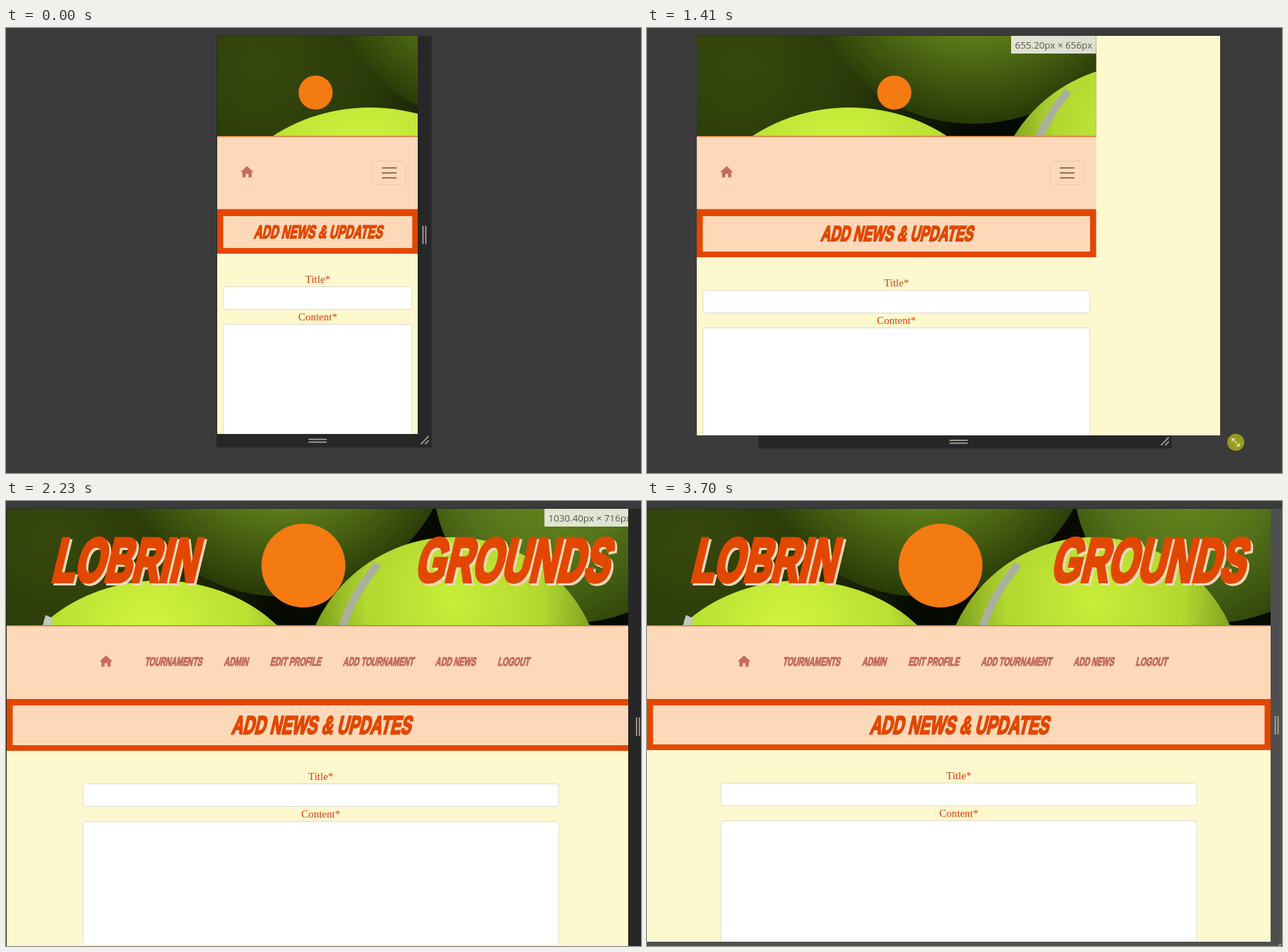
Recreate the animation shown at these times as an HTML page with a canvas. Size 893 by 627 pixels, loop 5.15 s.

```html
<!DOCTYPE html>
<html lang="en">
<head>
<meta charset="utf-8">
<title>Responsive page resize</title>
<style>
  html, body { margin: 0; width: 100%; height: 100%; overflow: hidden; background: #3b3b3b; }
  canvas { display: block; width: 893px; height: 627px; }
</style>
</head>
<body>
<canvas id="stage" width="893" height="627"></canvas>
<script>
const ctx = document.getElementById('stage').getContext('2d');
const LOOP = 5150, MID = 438, TOP = 11, ZOOM = 0.857, LAG = 70;
const ORANGE = '#e24700', PEACH = '#fdd9b9', CREAM = '#fef8cf', NAV = '#c16a5a', GRIP = '#b5ad9e';

// the picture changes in bursts: first, last, count
const bursts = [[130, 590, 7], [660, 800, 3], [940, 1410, 8], [1470, 1890, 7],
  [2030, 2290, 5], [2490, 2620, 3], [2890, 3360, 6], [3430, 3700, 3]];
const ticks = [0, ...bursts.flatMap(([a, b, n]) =>
  Array.from({ length: n }, (_, i) => Math.floor((a + (b - a) * i / (n - 1)) / 10) * 10))];

// viewport drag: time, half width, bottom edge
const drag = [[940, 141.4, 572], [970, 141.4, 573], [1270, 193.6, 573], [1410, 368, 574],
  [1540, 375, 574.6], [1610, 424, 584], [1820, 483, 594], [1890, 458, 594],
  [2220, 437.3, 633], [2890, 437.3, 633], [3290, 438.5, 621]];

const ramp = (t, a, b) => Math.min(1, Math.max(0, (t - a) / (b - a)));
const mix = (a, b, k) => a + (b - a) * k;

function viewport(t) {
  const i = Math.max(1, drag.findIndex(r => r[0] > t));
  const [a, b] = t >= drag.at(-1)[0] ? drag.slice(-2) : [drag[i - 1], drag[i]];
  const k = ramp(t, a[0], b[0]);
  return { half: mix(a[1], b[1], k), bottom: mix(a[2], b[2], k) };
}

function rect(x, y, w, h, color) {
  ctx.fillStyle = color;
  ctx.fillRect(x, y, w, h);
}

function clip(x, y, w, h) {
  ctx.beginPath();
  ctx.rect(x, y, w, h);
  ctx.clip();
}

function oval(x, y, rx, ry, fill) {
  ctx.beginPath();
  ctx.ellipse(x, y, rx, ry, 0, 0, 7);
  ctx.fillStyle = fill;
  ctx.fill();
}

const disc = (x, y, r, fill) => oval(x, y, r, r, fill);

function line(points, color, width) {
  ctx.beginPath();
  points.forEach(([x, y]) => ctx.lineTo(x, y));
  ctx.strokeStyle = color;
  ctx.lineWidth = width;
  ctx.stroke();
}

function shape(points, x, y, fill, stroke) {
  ctx.beginPath();
  points.forEach(([a, b]) => ctx.lineTo(x + a, y + b));
  ctx.closePath();
  ctx.fillStyle = fill;
  ctx.fill();
  if (!stroke) return;
  ctx.strokeStyle = stroke;
  ctx.lineWidth = 1;
  ctx.stroke();
}

function box(x, y, w, h, fill, stroke) {
  ctx.beginPath();
  ctx.roundRect(x, y, w, h, 4);
  if (fill) { ctx.fillStyle = fill; ctx.fill(); }
  ctx.strokeStyle = stroke;
  ctx.lineWidth = 1;
  ctx.stroke();
}

function radial(x, y, r, ...colors) {
  const g = ctx.createRadialGradient(x, y, 0, x, y, r);
  colors.forEach((c, i) => g.addColorStop(i / (colors.length - 1), c));
  return g;
}

// heavy slanted condensed face; returns the drawn width
function display(text, x, y, size, color, align = 'left') {
  ctx.save();
  ctx.transform(0.62, 0, -0.24, 1, x, y);
  ctx.font = `bold ${size}px "Liberation Sans", Arial, sans-serif`;
  ctx.textAlign = align;
  ctx.fillStyle = ctx.strokeStyle = color;
  ctx.lineWidth = size * 0.07;
  ctx.fillText(text, 0, 0);
  ctx.strokeText(text, 0, 0);
  ctx.restore();
  ctx.font = `bold ${size}px "Liberation Sans", Arial, sans-serif`;
  return ctx.measureText(text).width * 0.62;
}

function banner(text, x, y) {
  display(text, x + 3, y + 3, 86, PEACH);
  display(text, x, y, 86, ORANGE);
}

function seam(color, x, y, ...curve) {
  ctx.beginPath();
  ctx.moveTo(x, y);
  ctx.bezierCurveTo(...curve);
  ctx.strokeStyle = color;
  ctx.lineWidth = 11;
  ctx.stroke();
}

function photo(w, h) {
  rect(0, 0, w, h, radial(60, 40, 330, '#37490d', '#2a390a', '#060a01'));
  disc(800, -40, 200, radial(760, -40, 220, '#668a1c', '#54741a', '#31460b'));
  disc(389, -117, 241, radial(389, -140, 265, '#7c9c24', '#5f7f1a', '#283907'));
  disc(627, 252, 212, radial(630, 130, 250, '#c8ee3a', '#b2d831', '#56760f'));
  seam('#abb09c', 522, 78, 462, 150, 450, 230, 464, 300);
  oval(215, 291, 222, 190, radial(200, 180, 290, '#d4f640', '#b9df32', '#5d7d10'));
  seam('#c6c7bd', 60, 152, 44, 190, 76, 230, 90, 295);
}

function house(x, y) {
  const side = [[9, 0], [6.5, 0.5], [6.5, 7.5], [2, 7.5], [2, 2.5]];
  const left = side.map(([a, b]) => [-a, b]).reverse();
  shape([[0, -8.5], ...side, ...left], x, y, '#c96b5c');
}

function header(L, W, px) {
  const wide = px >= 992, small = px < 768;
  const H = small ? 141 : wide ? 164 : 287;
  ctx.save();
  ctx.translate(L, TOP);
  clip(0, 0, W, H);
  photo(W, H);
  if (small) {
    disc(W / 2 - 3, 80, 24, '#f47a12');
  } else {
    const d = W - (wide ? 873 : 750);
    disc((wide ? 410 : 543) + 0.7 * d, 80, 59, '#f47a12');
    banner('LOBRIN', (wide ? 59 : 104) + 0.23 * d, 102);
    if (wide) banner('GROUNDS', 563 + 0.957 * d, 102);
    else banner('GROUNDS', 234 + 0.5 * d, 248);
  }
  ctx.restore();
  return TOP + H;
}

function menu(L, W, y, wide) {
  rect(L, y, W, 105, PEACH);
  rect(L, y, W, 1.4, '#d4702a');
  if (wide) {
    const C = L + W / 2;
    house(C - 302, y + 51);
    let x = C - 248;
    for (const s of ['TOURNAMENTS', 'ADMIN', 'EDIT PROFILE', 'ADD TOURNAMENT', 'ADD NEWS', 'LOGOUT'])
      x += display(s, x, y + 57, 16.8, NAV) + 30.8;
    return;
  }
  rect(L, y + 103, W, 1, '#d4702a');
  const inset = Math.max(0, (W - 686) / 2);
  house(L + 42 + inset, y + 51);
  const bx = L + W - 64.5 - inset;
  box(bx, y + 35.5, 47, 33, null, '#efc8a8');
  for (let i = 0; i < 3; i++) rect(bx + 13.5, y + 44.3 + i * 7, 20.5, 1.8, '#7d6852');
}

function field(text, x, y) {
  ctx.font = '15px "Liberation Serif", Times, serif';
  ctx.textAlign = 'center';
  ctx.fillStyle = '#dc3d08';
  ctx.fillText(text, x, y);
}

function page(L, px) {
  const W = px * ZOOM, C = L + W / 2;
  rect(L, TOP, W, 640, CREAM);
  const nav = header(L, W, px);
  menu(L, W, nav, px >= 992);

  const grow = W - 283, y = nav + 104, h = Math.round(61.8 + grow * 0.018);
  rect(L, y, W, h, ORANGE);
  rect(L + 8.5, y + 9, W - 17, h - 17, PEACH);
  const size = 25.5 + grow * 0.0169;
  display('ADD NEWS & UPDATES', C, y + h / 2 + size * 0.36, size, ORANGE, 'center');

  const p = y + h, w = Math.min(W - 17.5, 669);
  field('Title*', C, p + 41);
  box(C - w / 2, p + 46.5, w, 32, '#fff', '#dcdad0');
  field('Content*', C, p + 94);
  box(C - w / 2, p + 99.5, w, 420, '#fff', '#dcdad0');
}

function bars(half, bottom, glow) {
  const v = Math.round(mix(39, 79, glow)), R = MID + half, cy = (TOP + bottom) / 2;
  rect(MID - half - 0.5, TOP, 2 * half + 19.5, bottom - TOP + 19, `rgb(${v},${v},${v + 1})`);
  for (const o of [7, 11]) {
    line([[R + o, cy - 13], [R + o, cy + 13]], GRIP, 1.6);
    line([[MID - 12.5, bottom + o + 0.5], [MID + 13, bottom + o + 0.5]], GRIP, 1.6);
  }
  line([[R + 4, bottom + 14.5], [R + 15, bottom + 3]], GRIP, 1.8);
  line([[R + 10, bottom + 14.5], [R + 15, bottom + 9]], GRIP, 1.8);
}

// lengths snap to 0.8px, whole numbers lose their decimals
function length(v) {
  const n = Math.round(v / 0.8) * 0.8, whole = Math.abs(n - Math.round(n)) < 0.01;
  return (whole ? Math.round(n) : n.toFixed(2)) + 'px';
}

function sizeTag(right, px, bottom) {
  const text = length(px) + ' × ' + length((bottom - TOP) / ZOOM);
  ctx.font = '13.3px "Open Sans", sans-serif';
  ctx.textAlign = 'left';
  const w = ctx.measureText(text).width + 11;
  rect(right - w, TOP, w, 25, 'rgba(240,240,230,.9)');
  ctx.fillStyle = '#55564c';
  ctx.fillText(text, right - w + 5.5, TOP + 18);
}

function resizer(x, y, color, width) {
  line([[x - 5, y - 5], [x + 5, y + 5]], color, width);
  for (const s of [-1, 1])
    line([[x + 5 * s, y + s], [x + 5 * s, y + 5 * s], [x + s, y + 5 * s]], color, width);
}

function cursor(t) {
  if (t < 130 || t > 1610) return;
  const near = ramp(t, 130, 800), p = ramp(t, 940, 1610);
  const x = mix(782, 594, near) + 298 * p * (1.4 - 0.4 * p);
  const y = mix(604, 579, near) + 14 * p ** 3;
  if (p === 1) {
    disc(x - 29, y - 3, 12, 'rgba(56,76,12,.55)');
    disc(x, y, 13, '#38500c');
  } else if (t >= 940) {
    disc(x, y, 12, '#979b22');
    resizer(x, y, '#f4f4d8', 1.1);
  } else if (t >= 660) {
    resizer(x, y, '#111', 3);
    resizer(x, y, '#fff', 1.2);
  } else {
    shape([[0, 0], [0, 15], [3.5, 12], [6, 17.5], [8.5, 16.5], [6, 11], [10.5, 11]], x, y, '#fff', '#111');
  }
}

function draw(t) {
  const now = viewport(t), laid = viewport(t - LAG);
  const L = Math.round(MID - now.half), W = Math.round(MID + now.half) - L;
  const px = 2 * laid.half / ZOOM;
  const glow = t < 940 ? ramp(t, 590, 800) : ramp(t, 3360, 3700);
  rect(0, 0, 893, 627, '#3b3b3b');
  rect(L, TOP - 1, W, 1, '#2b2b2b');
  bars(laid.half, laid.bottom, glow);

  ctx.save();
  clip(L, TOP, W, now.bottom - TOP);
  rect(L, TOP, W, now.bottom - TOP, CREAM);
  clip(L, TOP, W, laid.bottom - TOP);
  page(L, px);
  if ((t >= 940 && t < 2620) || (t >= 2890 && t < 3700)) sizeTag(L + px * ZOOM, px, laid.bottom);
  ctx.restore();
  cursor(t);
}

let shown = -1;
function play() {
  const now = performance.now() % LOOP;
  const t = ticks.filter(k => k <= now).pop();
  if (t !== shown) draw(shown = t);
  requestAnimationFrame(play);
}
play();
</script>
</body>
</html>
```
